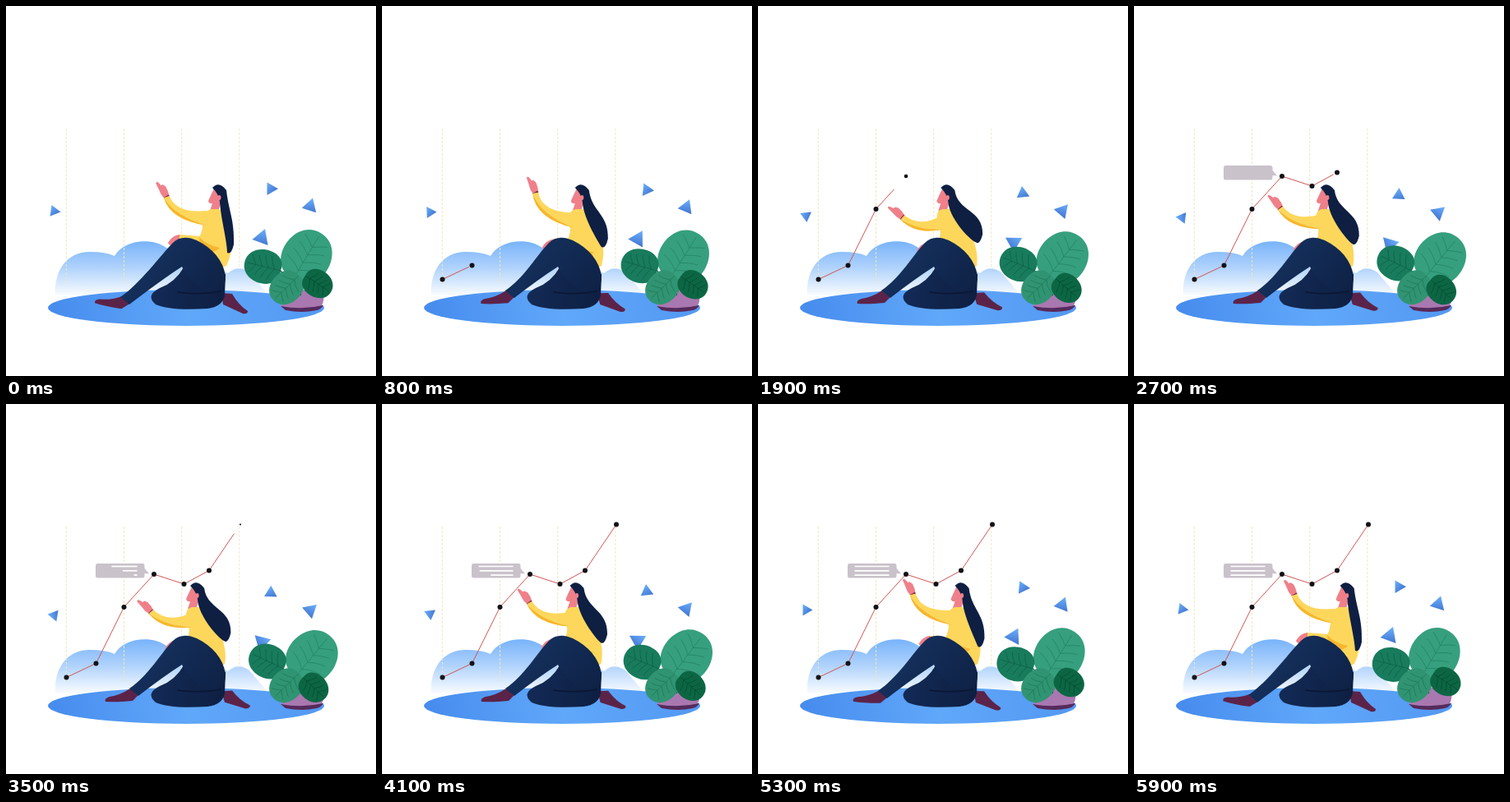
These frames come from a looping animation (450x450 px, 6000 ms). An HTML page with a canvas:

```html
<!DOCTYPE html>
<html>
<head>
<meta charset="utf-8">
<style>
html, body { margin: 0; width: 100%; height: 100%; overflow: hidden; background: #fff; }
canvas { display: block; }
</style>
</head>
<body>
<canvas id="stage" width="450" height="450"></canvas>
<script>
const ctx = document.getElementById('stage').getContext('2d');
const LOOP = 6000, STEP = 100, RAD = Math.PI / 180;
const SKIN = '#ef808a', YELLOW = '#fdd75c', ORANGE = '#f6b62e', HAIR = '#0f1f42';

const mix = (a, b, k) => a + (b - a) * k;
const ramp = (t, start, end) => Math.min(1, Math.max(0, (t - start) / (end - start)));
const ease = k => k * k * (3 - 2 * k);

function fade(x0, y0, x1, y1, ...colors) {
  const g = ctx.createLinearGradient(x0, y0, x1, y1);
  colors.forEach((c, i) => g.addColorStop(i / (colors.length - 1), c));
  return g;
}

function shape(path, color) {
  ctx.fillStyle = color;
  ctx.fill(new Path2D(path));
}

function line(path, color, width) {
  ctx.strokeStyle = color;
  ctx.lineWidth = width;
  ctx.stroke(new Path2D(path));
}

function ellipse(x, y, rx, ry, color) {
  ctx.beginPath();
  ctx.ellipse(x, y, rx, ry, 0, 0, 7);
  ctx.fillStyle = color;
  ctx.fill();
}

// Runs draw in a moved, turned and scaled frame; angle in degrees
function placed(x, y, angle, scale, draw) {
  ctx.save();
  ctx.translate(x, y);
  ctx.rotate(angle * RAD);
  ctx.scale(scale, scale);
  draw();
  ctx.restore();
}

function drawBackdrop() {
  ctx.fillStyle = '#fff';
  ctx.fillRect(0, 0, 450, 450);
  shape('M60 352C58 322 74 299 102 299Q121 299 132 304C143 284 178 281 195 294L270 325Q282 314 296 324L320 352Z',
    fade(0, 285, 0, 352, '#76b2fa', '#b0d3fc', '#fafcff'));
  ellipse(219, 367, 168, 22, fade(51, 389, 387, 345, '#468bed', '#60a8fa', '#5298f2'));
  ctx.setLineDash([3, 2]);
  for (let i = 0; i < 4; i++) line(`M${73.3 + i * 70.2} 149V${i < 3 ? 338 : 318}`, '#f0e6bd', 1);
  ctx.setLineDash([]);
}

function drawTriangle(x, y, r, angle, turn, sway) {
  placed(x, y + 8 * sway, angle + turn * sway, r, () => {
    let path = 'M1 0';
    for (const a of [120, 240]) path += `L${Math.cos(a * RAD)} ${Math.sin(a * RAD)}`;
    shape(path + 'Z', fade(-.6, -.6, .8, .6, '#69adfb', '#3d6ec9'));
  });
}

function leaf(x, y, angle, length, wide, color, vein) {
  placed(x, y, angle, length, () => {
    const w = wide / .75;
    shape(`M0 0C-.1 ${-w} 1 ${-w} 1 0C1 ${w} -.1 ${w} 0 0Z`, color);
    let veins = 'M0 0H.92';
    for (let a = .17; a < .7; a += .17)
      for (const side of [-1, 1]) veins += `M${a} 0q.12 ${side * wide * .35} .15 ${side * wide * (.8 - a * .4)}`;
    line(veins, vein, .7 / length);
  });
}

function drawPlant(s) {
  leaf(350 + 3 * s, 331, -59 + 9 * s, 64, .465, '#369f7e', '#238263');
  leaf(334 + 4 * s, 322, 194 + 12 * s, 45, .46, '#187b5c', '#0d6046');
  line(`M358 352L${350 + 3 * s} 330M358 352L${334 + 4 * s} 322M358 350L364 331`, '#174f43', 1.3);
  shape('M333 350Q360 340 386 350Q388 362 380 369Q360 374 339 369Q330 361 333 350Z', '#a978b0');
  shape('M334 365Q360 370 386 364Q383 369 378 370Q360 374 340 370Z', '#572a5c');
  line('M358 352L355 331', '#2a2040', 2);
  leaf(356, 328, 136, 43, .44, '#309472', '#1b7757');
  leaf(364 - 3 * s, 328 + 5 * s, 33 + 11 * s, 37, .45, '#0c6644', '#054b30');
}

// Height of the pointing arm in degrees over time
const gestures = [[0, 27], [800, 35], [1900, 5.5], [2700, 17], [3500, 10], [4700, 32], [LOOP, 27]];

function poseAt(t) {
  const i = gestures.findIndex(g => g[0] > t);
  const [[t0, a], [t1, b]] = [gestures[i - 1], gestures[i]];
  const raise = mix(a, b, ease(ramp(t, t0, t1)));
  const foot = ease(ramp(t, 0, 900)) * (1 - ease(ramp(t, 4800, LOOP)));
  return { raise, foot, lean: mix(.36, 1.03, foot) - raise / 75 };
}

function drawArm(lean, raise) {
  const sx = 244 - 20 * lean, sy = 257 + 5 * lean;
  const reach = 48 + raise / 4;
  const wx = sx - reach * Math.cos(raise * RAD), wy = sy - reach * Math.sin(raise * RAD);
  const ex = (sx + wx) / 2 - 2 - raise / 2, ey = (sy + wy) / 2 + 16 - raise * .15;
  placed(wx, wy, 213 + raise * .9, 1, () => {
    shape('M-2 -3L6 -4Q12 -3 21 -2Q24 1 15 2Q17 4 11 6Q5 6 -2 3Z', SKIN);
    line('M0 -3.5V3.5', '#74273c', 2);
  });
  const d = Math.hypot(ex - wx, ey - wy), nx = (ey - wy) / d * 3.5, ny = (wx - ex) / d * 3.5;
  const under = `Q${ex - 4} ${ey + 4} ${wx - nx} ${wy - ny}Z`;
  shape(`M${wx + nx} ${wy + ny}Q${ex + 3} ${ey - 4} ${sx} ${sy - 8}V${sy + 10}${under}`, YELLOW);
  shape(`M${wx - nx} ${wy - ny}Q${ex + 1} ${ey - 1} ${sx} ${sy + 10}${under}`, ORANGE);
}

function drawHair(x, lean) {
  const tx = 272 - 4 * lean, ty = 300 - 13 * lean;
  shape(`M${x - 2} 221Q${x + 6} 212 ${x + 15} 224C${x + 18} 250 ${tx + 6} ${ty - 40} ${tx + 5} ${ty - 10}
    Q${tx + 2} ${ty + 3} ${tx - 3} ${ty}C${tx - 3 - 10 * lean} ${ty - 14 + 10 * lean} ${x + 8} 257 ${x + 7} 238
    Q${x + 6} 229 ${x - 2} 221Z`, HAIR);
  ellipse(x + 6.5, 233, 2, 3, SKIN);
}

function drawLegs(lean, foot) {
  const ax = 145 + 11 * foot, ay = 358 - 8 * foot;
  placed(264, 349, -9 * lean, 1, () => shape('M-2 0L11 1Q19 15 30 22Q30 26 24 25L0 14Z', '#5c2349'));
  shape('M216 318Q206 336 187 343Q169 352 182 363Q200 371 245 368Q263 366 266 352L267 326Z',
    fade(180, 345, 265, 360, '#132a55', '#0e1f42'));
  placed(ax, ay, 14 - 14 * foot, 1, () => shape('M-5 -4L6 3L-2 11Q-22 13 -35 12Q-37 8 -30 6Q-17 4 -5 -4Z', '#5c2349'));
  shape(`M${ax - 6} ${ay - 4}C${ax + 18} ${ay - 20} 188 303 203 288Q214 277 232 285Q262 300 267 328
    Q267 350 250 349Q226 341 214 317Q192 331 ${ax + 5} ${ay + 5}Z`, fade(190, 290, 262, 350, '#14305c', '#0f2145'));
  line('M208 348Q235 352 262 347', '#0a1634', 1.5);
}

function drawWoman({ lean, foot, raise }) {
  const headX = 253 - 30 * lean;
  placed(headX, 222, 0, 1, () => shape('M0 0Q-4 8 -7 15Q-6 19 -2 18L-5 27Q0 31 5 28L10 12L6 2Z', SKIN));

  // The upper body slants about the hip
  ctx.save();
  const slant = .355 * lean;
  ctx.transform(1, 0, slant, 1, -322 * slant, 0);
  shape('M250 247Q238 250 239 266Q239 276 233 284L262 319L268 316Q277 298 274 274Q271 250 258 247Z', YELLOW);
  ctx.restore();

  drawArm(lean, raise);
  drawHair(headX, lean);
  placed(211 - 4 * lean, 282 + 10 * lean, 0, 1, () => {
    shape('M0 -4Q-9 -3 -14 6Q-12 11 -7 8L2 4Z', SKIN);
    shape('M0 -4L25 -2Q42 2 54 8L51 24Q32 20 19 13L0 4Z', YELLOW);
    shape('M24 -1Q33 9 49 12Q42 21 25 13Z', ORANGE);
  });
  drawLegs(lean, foot);
}

// Chart points: x, y and the time the line gets there
const points = [[73.5, 332.5, 400], [109.5, 315.5, 850], [143.5, 247, 1750], [180, 207, 2000],
  [216.5, 219, 2460], [247, 202.5, 2740], [285, 146.5, 3690]];

function drawChart(t) {
  let path = '';
  points.forEach(([x, y, time], i) => {
    const [px, py, before] = points[Math.max(0, i - 1)];
    const k = i ? ramp(t, before, time) : 1;
    path += `${i ? 'L' : 'M'}${mix(px, x, k)} ${mix(py, y, k)}`;
    if (k < 1) path += `M${x} ${y}`;
  });
  line(path.replace(/M[^L]*(?=L)/g, (m, at) => at ? m : m).split('M').slice(0, 2).join('M'), '#cf5552', 1);
  for (const [x, y, time] of points) {
    const r = 3 * ramp(t, time - 270, time - 50);
    if (r) ellipse(x, y, r, r, '#111118');
  }
}

function drawBubble(t) {
  const k = ramp(t, 2100, 2500);
  if (!k) return;
  placed(174, 206, 0, k, () => {
    shape('M-62.500 -12H-8Q-5.500 -12 -5.500 -9V-6L0 .5L-5.500 0V3Q-5.500 5.500 -8 5.500H-62.500Q-65 5.500 -65 3V-9Q-65 -12 -62.500 -12Z', '#c9c2ca');
    for (let i = 0; i < 3; i++) {
      const w = 42 * ramp(t, 2700 + i * 350, 3780 + i * 350);
      if (w) line(`M-14.500 ${-8.5 + i * 5.3}h${-w}`, '#fff', 1.7);
    }
  });
}

function frame() {
  const t = Math.floor(performance.now() % LOOP / STEP) * STEP;
  const sway = (1 - Math.cos(t / LOOP * 2 * Math.PI)) / 2;
  drawBackdrop();
  drawTriangle(58.5, 249.5, 8, 8, -63, sway);
  drawTriangle(322, 222.3, 9, 0, 34, sway);
  drawTriangle(370, 243.5, 10.5, 47, 34, sway);
  drawTriangle(311, 282, 11.7, 50, 58, sway);
  drawBubble(t);
  drawChart(t);
  drawWoman(poseAt(t));
  drawPlant(sway);
  requestAnimationFrame(frame);
}
frame();
</script>
</body>
</html>
```
